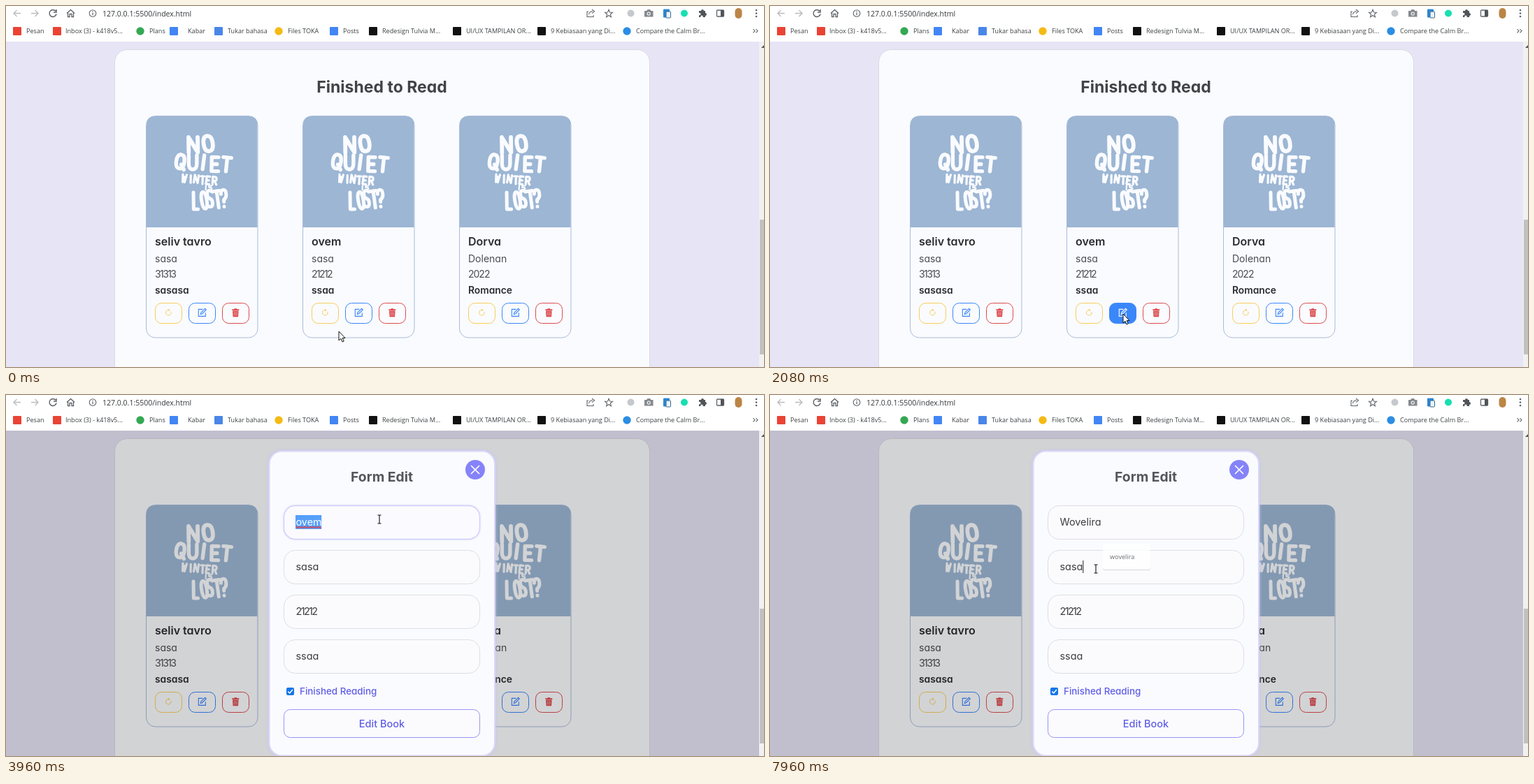
Animation of 1084x517 px, one loop 8000 ms. Source, as an HTML page:

```html
<!DOCTYPE html>
<html lang="en">
<head>
<meta charset="utf-8">
<title>Book shelf form</title>
<style>
  html, body { margin: 0; width: 100%; height: 100%; overflow: hidden; background: #fff; }
  svg { display: block; width: 1084px; height: 517px; }
  text { font-family: Inter, "Open Sans", sans-serif; font-feature-settings: "cv11"; white-space: pre; }
  .ui text { font-family: "Open Sans", "Noto Sans", sans-serif; font-size: 9.1px; fill: #3c4043; }
  .ui text.url { font-size: 10.5px; fill: #333639; }
  .line { fill: none; stroke: #5f6368; stroke-width: 1.3; }
  .letters path { fill: none; stroke: #fafbfe; stroke-linecap: round; stroke-linejoin: round; vector-effect: non-scaling-stroke; }
  .name { font-size: 16px; font-weight: 600; fill: #2b2b30; }
  .info { font-size: 14px; fill: #4c4c52; }
  .tag { font-size: 13.8px; font-weight: 600; fill: #2b2b30; }
  .btn rect { fill: transparent; stroke: var(--c); }
  .btn .icon { color: var(--c); }
  .btn.on rect { fill: var(--c); }
  .btn.on .icon { color: #fff; }
  .field { fill: #fbfbfe; stroke: #dddee5; }
  .value { font-size: 14.4px; fill: #3c3c42; }
  .accent { fill: #5f5de8; font-weight: 500; }
  #hintFrame { filter: drop-shadow(0 1px 1.5px #0005); }
  .fading #hintFrame { filter: drop-shadow(0 1px .5px #0003); }
  .fading { opacity: .75; }
</style>
</head>
<body>
<svg id="stage" viewBox="0 0 1084 517"></svg>
<script>
const text = (x, y, value, attrs = '') => `<text x="${x}" y="${y}" ${attrs}>${value}</text>`;
const box = (x, y, w, h, r, attrs = '') => `<rect x="${x}" y="${y}" width="${w}" height="${h}" rx="${r}" ${attrs}/>`;
const dot = (x, y, r, fill) => `<circle cx="${x}" cy="${y}" r="${r}" fill="${fill}"/>`;
const path = (d, attrs = '') => `<path d="${d}" ${attrs}/>`;
const at = (x, y, inner, attrs = '') => `<g transform="translate(${x} ${y})" ${attrs}>${inner}</g>`;

// Browser bars
const bookmarks = [
  [16, 'square', '#ea4335', 29, 'Pesan'],
  [73, 'square', '#ea4335', 85, 'Inbox (3) - k418v5...'],
  [192, 'circle', '#34a853', 205, 'Plans'],
  [240, 'square', '#4285f4', 260, 'Kabar'],
  [304, 'square', '#4a86e8', 317, 'Tukar bahasa'],
  [390, 'circle', '#f5ba15', 403, 'Files TOKA'],
  [469, 'square', '#4285f4', 482, 'Posts'],
  [525, 'square', '#111', 538, 'Redesign Tulvia M...'],
  [645, 'square', '#111', 658, 'UI/UX TAMPILAN OR...'],
  [766, 'square', '#111', 779, '9 Kebiasaan yang Di...'],
  [888, 'circle', '#2b8de3', 901, 'Compare the Calm Br...']
];

function browserBars() {
  const marks = bookmarks.map(([x, shape, color, tx, label]) =>
    (shape === 'circle' ? dot(x, 36, 5.7, color) : box(x - 6, 30, 12, 12, 1, `fill="${color}"`)) + text(tx, 39.3, label)).join('');
  const star = Array.from({ length: 10 }, (_, i) => {
    const a = i * Math.PI / 5, r = i % 2 ? 2.5 : 5.8;
    return `${(862 + r * Math.sin(a)).toFixed(1)} ${(11 - r * Math.cos(a)).toFixed(1)}`;
  }).join('L');
  return `<g class="ui">${box(0, 0, 1084, 51, 0, 'fill="#fff"')}
    ${path('M21 10.5H11M15.5 6L11 10.5L15.5 15M36 10.5H46M41.5 6L46 10.5L41.5 15', 'class="line" style="stroke:#b9bbbe"')}
    ${path('M71 7.3A5 5 0 1 0 72 11.5M72 5V9H68', 'class="line" style="stroke-width:1.5"')}
    ${path('M87 10.5L92.5 5.5L98 10.5M88.5 9.5V15.5H91V11.5H94V15.5H96.5V9.5', 'class="line"')}
    <circle cx="124" cy="10.5" r="4.8" class="line" style="stroke-width:1.1"/>
    ${path('M124 9.8V13M124 7.6V8.7', 'class="line"')}
    ${text(138, 14.5, '127.0.0.1:5500/index.html', 'class="url"')}
    ${path('M833 8H831V15.5H840V13M833.5 12Q834 7.8 839 7.8M838 5L841.5 7.8L838 10.7', 'class="line" style="stroke-width:1.1"')}
    ${path('M' + star + 'Z', 'class="line" style="stroke-width:1.1"')}
    ${dot(893.5, 10.5, 5, '#c5c8cc')}
    ${path('M913 7H916L917.5 5H921L922.5 7H925.5V15.5H913Z', 'fill="#85898e"')}${dot(919.2, 11, 2.6, '#fff')}${dot(919.2, 11, 1.6, '#85898e')}
    ${box(940, 4.5, 9, 12, 1, 'fill="#2c86d1"')}${box(944, 8, 6.5, 9, 1, 'fill="#eaf4ff" stroke="#39698f"')}
    ${dot(970, 10.5, 5, '#17dfb0')}
    ${path('M991 7H994A2 2 0 1 1 998 7H1000V10A2 2 0 1 1 1000 14V16H996.5A1.7 1.7 0 1 0 993.5 16H991V13A1.7 1.7 0 1 0 991 10Z', 'fill="#505459"')}
    ${box(1016.5, 6, 10, 9, 1, 'class="line"')}${box(1022, 6, 4.5, 9, 0, 'fill="#505459"')}
    ${box(1042.5, 3, 10, 15, 5, 'fill="#bb8544"')}
    ${[6, 10.5, 15].map(y => dot(1073, y, 1.3, '#5f6368')).join('')}
    ${marks}
    ${path('M1068.5 33L1071 35.7L1068.5 38.4M1072.5 33L1075 35.7L1072.5 38.4', 'class="line" style="stroke-width:1.1"')}</g>`;
}

// Cover lettering: each glyph lives on a 6 by 10 grid
const glyphs = {
  N: 'M0 10V0L6 10V0', O: 'M3 0Q6 0 6 5T3 10T0 5T3 0', Q: 'M3 0Q6 0 6 5T3 10T0 5T3 0M4 7L6.5 10.5',
  U: 'M0 0V6Q0 10 3 10T6 6V0', I: 'M3 0V10', E: 'M5 0H0V10H5M0 5H4', T: 'M0 0H6M3 0V10',
  W: 'M0 0L1.5 10L3 3L4.5 10L6 0', R: 'M0 10V0H3Q6 0 6 2.7T3 5.5H0M3 5.5L6 10',
  S: 'M6 1Q0 -1 0 2.5Q0 4.5 3 5T6 8Q6 11 0 9.3', L: 'M0 0V10H5', '?': 'M0 2.5Q0 0 3 0T6 3Q6 5 3 6V7.2M3 10V10.1'
};
// word, x, y, glyph width, glyph height, step, tilt, stroke
const words = [
  ['NO', 61, 31, 13, 22, 20, -5, 5.8], ['QUIET', 45, 55, 11.5, 20, 16.5, 4, 5.4],
  ['WINTER', 53, 84, 5.5, 11, 8.6, 5, 3.2], ['IS', 84, 100, 4, 6, 6, 0, 2.2], ['LOST?', 68, 110, 7.5, 24, 9.8, -5, 5]
];

function word([letters, x, y, w, h, step, tilt, stroke]) {
  const drawn = [...letters].map((c, i) => {
    const lift = Math.sin(i * 2.4) * h * .06, lean = Math.sin(i * 3 + 1) * 5;
    return `<g transform="translate(${i * step} ${lift}) rotate(${lean}) scale(${w / 6} ${h / 10})">${path(glyphs[c], `stroke-width="${stroke}"`)}</g>`;
  });
  return `<g transform="translate(${x} ${y}) rotate(${tilt})">${drawn.join('')}</g>`;
}
const lettering = `<g class="letters">${words.map(word).join('')}</g>`;

// Cards
const icons = [
  path('M0 -3.8A3.8 3.8 0 1 0 3.5 -1.5', 'fill="none" stroke="currentColor" stroke-width="1"') +
    path('M0 -5.8V-1.9L2.4 -3.8Z', 'fill="currentColor"'),
  path('M1 -4.8H-5V5.2H5V0M-2 2.2L-1.4 -.2L4.3 -5.9L6 -4.2L.3 1.5Z', 'fill="none" stroke="currentColor" stroke-width="1.1"'),
  path('M-5 -5H-1.8V-6H1.8V-5H5V-3.3H-5ZM-4.3 -2.6H4.3L3.7 6H-3.7Z', 'fill="currentColor"') +
    path('M-1.9 -1V4.3M0 -1V4.3M1.9 -1V4.3', 'stroke="#fff" stroke-opacity=".6" stroke-width=".7"')
];
const colors = ['#f8cd5d', '#3a87fb', '#dc4c50'];

function card(x, name, writer, year, kind, spacing) {
  const buttons = colors.map((c, i) => at(13 + i * 48, 268, box(.5, .5, 38, 29, 9) +
    at(19.3, 14.2, icons[i], 'class="icon"'), `class="btn" style="--c:${c}"`)).join('');
  return at(x, 157, box(.5, .5, 159.5, 317.5, 13, 'fill="#fafbfe" stroke="#a9bbdb"') +
    path('M1 160V13Q1 1 13 1H147.5Q159.5 1 159.5 13V160Z', 'fill="#9cb6d4"') + lettering +
    text(13, 186.3, name, 'class="name"') + text(13, 209.8, writer, 'class="info"') +
    text(13, 231.8, year, `class="info" letter-spacing="${spacing}"`) + text(13, 254.5, kind, 'class="tag"') + buttons, 'class="card"');
}

// Form
const fieldTops = [158, 222, 286, 350];
const form = `<g id="form">
  ${box(0, 51, 1077, 466, 0, 'opacity=".16"')}
  ${box(376.5, 80.5, 322.5, 436, 18, 'fill="#fafbfe" stroke="#d9d8f8" stroke-width="2" style="filter:drop-shadow(0 0 2px #c5c2f5)"')}
  ${text(537.5, 123.5, 'Form Edit', 'font-size="19.3" font-weight="700" fill="#55555c" text-anchor="middle"')}
  ${dot(671, 107, 14, '#8583f9')}${path('M665.5 101.5L676.5 112.5M676.5 101.5L665.5 112.5', 'stroke="#fff" stroke-width="1.7" stroke-linecap="round"')}
  ${fieldTops.map(y => box(397.5, y + .5, 280, 48, 16, 'class="field"')).join('')}
  ${box(397.5, 158.5, 280, 48, 16, 'id="focus" fill="#fbfaff" stroke="#cfcdfb" stroke-width="1.3" style="filter:drop-shadow(0 0 1.5px #e2e0fc)"')}
  ${box(414, 172, 0, 20, 0, 'id="marked" fill="#559ffa"')}
  ${text(414.5, 187, '', 'id="title" class="value"')}
  ${path('M414.5 189.5' + 'q1 -2 2 0t2 0'.repeat(9), 'id="squiggle" fill="none" stroke="#e5343a" stroke-width="1.2"')}
  ${text(414.5, 251, 'sasa', 'id="writer" class="value"')}
  ${text(414.5, 315, '21212', 'class="value" letter-spacing="-1.6"')}
  ${text(414.5, 379, 'ssaa', 'class="value"')}
  ${box(401, 419, 11, 11, 2, 'fill="#1676e8"')}${path('M403.3 424.6L405.7 427L409.9 422', 'fill="none" stroke="#fff" stroke-width="1.5"')}
  ${text(420, 429.3, 'Finished Reading', 'class="accent" font-size="13.4"')}
  ${box(397.5, 450.5, 280, 40, 9, 'fill="#fbfbfe" stroke="#9896f6"')}
  ${text(537.5, 475.5, 'Edit Book', 'class="accent" font-size="14.5" text-anchor="middle"')}
  <g id="hints" class="ui"><g id="hintFrame">
    ${box(476, 213, 68, 37, 3, 'id="hintBox" fill="#fff"')}${path('M487 213.5L494 207.5L501 213.5Z', 'id="hintTip" fill="#fff"')}</g>
    ${['wovelira', 'worlando', 'wimeda', 'wurita'].map((w, i) => text(486, 235 + i * 19.7, w)).join('')}</g>
  ${box(0, 173, 1, 18, 0, 'id="caret" fill="#222"')}</g>`;

const pointers = `<g id="pointer">
  ${path('M0 0V13L3 10.3L5 15L7.2 14L5.2 9.5H9Z', 'id="arrow" fill="#fff" stroke="#111" stroke-width="1"')}
  ${path('M-1.7 1Q0 -1 1.7 1V6.5L6.5 8Q8 8.5 7.5 12L6 18H-1L-4.8 12Q-5.5 9 -1.7 11.5ZM2 7V10M4.5 8V10.5', 'id="hand" fill="#fff" stroke="#111" stroke-width="1"')}
  ${path('M-2.5 -6H-.8L0 -5.4L.8 -6H2.5M0 -5.5V5.5M-2.5 6H-.8L0 5.4L.8 6H2.5', 'id="beam" fill="none" stroke="#111" stroke-width="1.1"')}</g>`;

document.getElementById('stage').innerHTML = `
  ${box(0, 51, 1077, 466, 0, 'fill="#e6e4f5"')}
  ${box(155.5, 62.5, 765, 490, 18, 'fill="#fafbfe" stroke="#d9d9e2"')}
  ${text(537.5, 124, 'Finished to Read', 'font-size="23" font-weight="700" fill="#434347" text-anchor="middle"')}
  ${card(200, 'seliv tavro', 'sasa', '31313', 'sasasa', -1.6)}
  ${card(424, 'ovem', 'sasa', '21212', 'ssaa', -1.6)}
  ${card(648, 'Dorva', 'Dolenan', '2022', 'Romance', -1)}
  ${form}
  ${box(1077, 51, 7, 466, 0, 'fill="#f1f1f1"')}${box(1078, 306, 6, 193, 0, 'fill="#c1c1c1"')}
  ${path('M1080 60L1084 56V60Z', 'fill="#505050"')}
  ${browserBars()}${pointers}`;

// time, x, y, pointer, hovered button
const moves = [
  [0, 476, 466, 'arrow'], [120, 469, 456, 'arrow'], [250, 464, 447, 'hand', 0], [390, 489, 447, 'hand', 1],
  [520, 516, 447, 'hand', 1], [660, 538, 448, 'hand', 2], [780, 546, 445, 'hand', 2], [900, 549, 443, 'hand', 2],
  [1330, 543, 444, 'hand', 2], [1460, 528, 445, 'arrow'], [1590, 515, 444, 'hand', 1], [1730, 508, 442, 'hand', 1],
  [1860, 505, 441, 'hand', 1], [2080, 505, 441, 'arrow', 1], [2200, 505, 441, 'arrow'],
  [2470, 507, 425, 'arrow'], [2600, 514, 376, 'beam'], [2740, 524, 310, 'beam'], [2870, 534, 248, 'beam'],
  [3000, 541, 202, 'beam'], [3130, 542, 184, 'beam'], [3270, 537, 180, 'beam'], [3400, 534, 179, 'beam'],
  [3530, 485, 184, 'beam'], [3660, 405, 191, 'beam'], [3800, 363, 188, 'beam'], [3960, 534, 178, 'beam'],
  [7050, 533, 180, 'beam'], [7180, 528, 186, 'beam'], [7310, 517, 200, 'beam'], [7440, 502, 216, 'arrow'],
  [7570, 486, 233, 'arrow'], [7700, 472, 245, 'beam'], [7830, 466, 249, 'beam']
];
const typing = [[0, 'ovem'], [4820, 'W'], [4940, 'Wo'], [5220, 'Wov'], [5340, 'Wove'], [5620, 'Wovel'],
  [5770, 'Woveli'], [6170, 'Wovelir'], [6610, 'Wovelira']];
// caret place: 1 in the first field, 2 in the second
const carets = [[0, 0], [3270, 1], [3660, 0], [4820, 1], [6320, 0], [6610, 1], [7830, 2]];

const $ = id => document.getElementById(id);
const latest = (table, t) => table.findLast(row => row[0] <= t);
const show = (id, on) => $(id).style.display = on ? '' : 'none';
const buttons = document.querySelectorAll('.card:nth-of-type(2) .btn');
const hintRows = document.querySelectorAll('#hints text');

function draw(t) {
  const [, x, y, kind, hover] = latest(moves, t);
  $('pointer').setAttribute('transform', `translate(${x} ${y})`);
  for (const id of ['arrow', 'hand', 'beam']) show(id, id === kind);
  buttons.forEach((b, i) => b.classList.toggle('on', i === hover));

  show('form', t >= 2200);
  $('focus').style.opacity = t < 7830 ? Math.min(1, Math.max(0, (t - 3270) / 690)) : 0;
  $('title').textContent = latest(typing, t)[1];
  const width = t >= 2200 ? $('title').getComputedTextLength() : 0;
  const selected = t >= 3660 && t < 4820;
  $('marked').setAttribute('width', selected ? width : 0);
  $('title').style.fill = selected ? '#fff' : '';
  show('squiggle', t >= 3270 && t < 4820);

  const place = latest(carets, t)[1];
  show('caret', place);
  if (place) {
    $('caret').setAttribute('x', 414.5 + (place === 2 ? $('writer').getComputedTextLength() : width));
    $('caret').setAttribute('y', place === 2 ? 237 : 173);
  }

  const rows = t < 5220 ? 4 : 1;
  show('hints', t >= 4820);
  show('hintTip', t < 7960);
  $('hints').classList.toggle('fading', t >= 7960);
  $('hintBox').setAttribute('height', 37 + (rows - 1) * 19.7);
  hintRows.forEach((row, i) => row.style.display = i < rows ? '' : 'none');
}

const start = performance.now();
function frame(now) {
  draw(Math.max(0, now - start) % 8000);
  requestAnimationFrame(frame);
}
draw(0);
requestAnimationFrame(frame);
</script>
</body>
</html>
```
